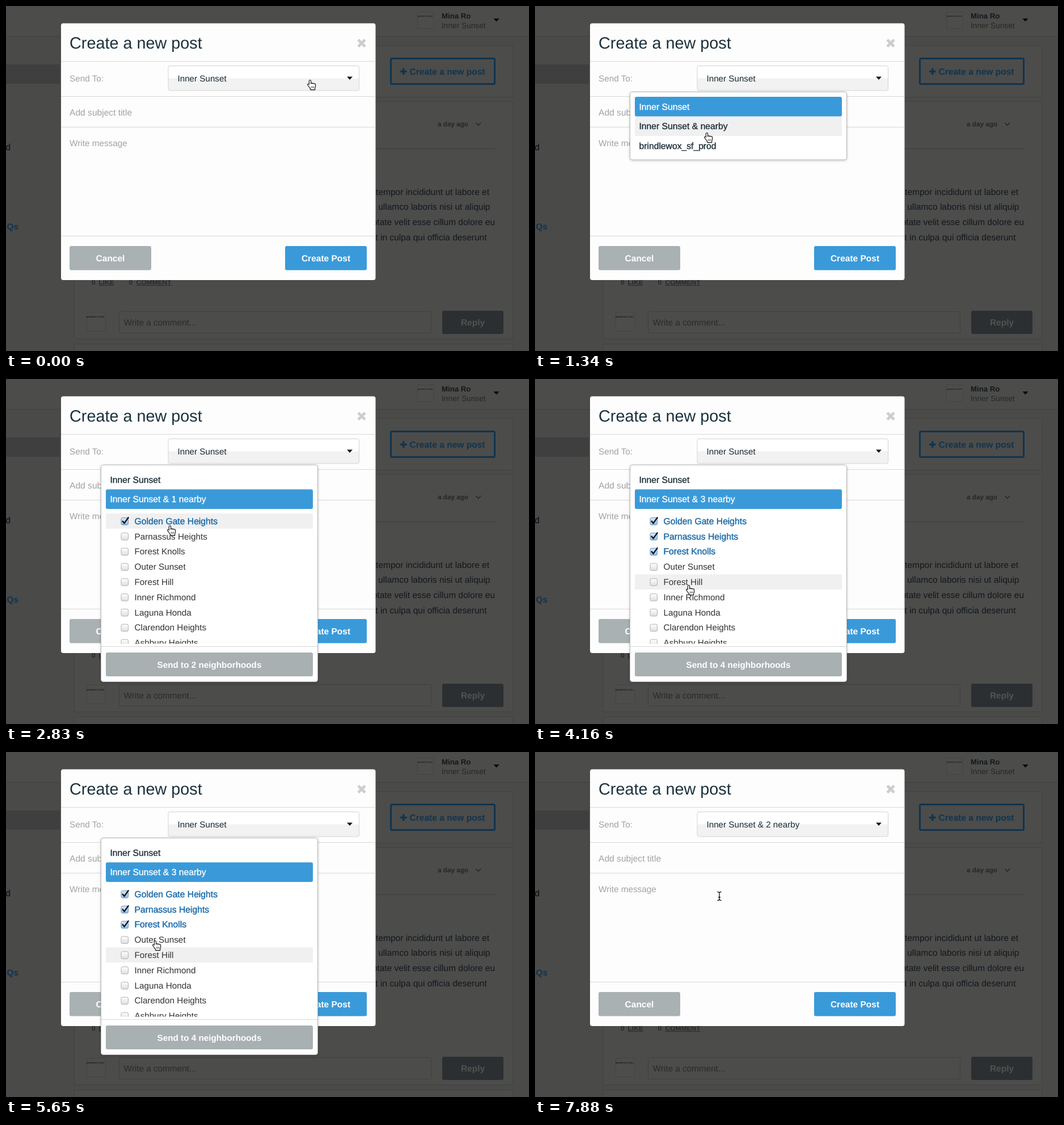
These frames come from a looping animation (922x608 px, 8000 ms). An HTML page:

```html
<!DOCTYPE html>
<html lang="en">
<head>
<meta charset="utf-8">
<title>Create a new post</title>
<style>
  html, body { margin: 0; width: 100%; height: 100%; overflow: hidden; background: #4a4a49; }
  svg { display: block; width: 922px; height: 608px; font: 15.3px "Liberation Sans", Arial, sans-serif; text-rendering: geometricPrecision; }
  text { fill: #12181c; }
  .bold { font-weight: bold; }
  .mid { font-size: 15.7px; fill: #1b2c37; stroke: #1b2c37; stroke-width: .35px; }
  .on { font-size: 15.7px; fill: #1c6ca9; stroke: #1c6ca9; stroke-width: .45px; }
  .lit { fill: #fff; stroke: #fff; }
  .hint { fill: #a2a2a2; }
  .btn { font-weight: bold; font-size: 15.5px; fill: #fff; text-anchor: middle; }
  .end { text-anchor: end; }
  .card { fill: #4c4c4b; stroke: #424241; }
  .rule { stroke: #d8d8d8; }
  .row { fill: #333; }
  .menu { fill: #fff; stroke: #b9b9b9; filter: drop-shadow(0 1px 2px rgba(0, 0, 0, .22)); }
  .tick { fill: none; stroke: #0b1320; stroke-width: 2.3px; }
</style>
</head>
<body>
<svg viewBox="0 0 922 608">
  <defs>
    <linearGradient id="boxOff" x2="0" y2="1"><stop stop-color="#fff"/><stop offset="1" stop-color="#dedede"/></linearGradient>
    <linearGradient id="boxOn" x2="0" y2="1"><stop stop-color="#dcebf8"/><stop offset="1" stop-color="#8fbde6"/></linearGradient>
    <clipPath id="listClip"><rect x="168" y="230" width="382" height="236.5"/></clipPath>
  </defs>

  <!-- dimmed page -->
  <rect width="922" height="608" fill="#4a4a49"/>
  <rect width="922" height="53" fill="#4c4c4b"/>
  <path d="M0 53.5H922" stroke="#404040"/>
  <rect y="103" width="95" height="34" fill="#3f3f3f"/>
  <rect class="card" x="120.5" y="69.5" width="773" height="91"/>
  <rect class="card" x="120.5" y="168.5" width="773" height="418"/>
  <rect class="card" x="120.5" y="595.5" width="773" height="30"/>
  <path d="M140 251.5H862" stroke="#3d3d3d"/>

  <g fill="#4d4d4c" stroke="#434343">
    <rect x="725.5" y="10.5" width="28" height="29"/>
    <rect x="142.5" y="539.5" width="33" height="33" rx="2"/>
  </g>
  <text class="bold" x="726" y="18.5" font-size="3.6">posted in 2 min</text>
  <text class="bold" x="142" y="549" font-size="4.2">posted in 2 min</text>
  <text class="bold" x="768" y="22.2" font-size="13.2">Mina Ro</text>
  <text x="768" y="38.5" font-size="13.7" style="fill:#272727">Inner Sunset</text>
  <path d="M859.5 22H869.5L864.5 27.5Z" fill="#080808"/>

  <rect x="678.5" y="92.5" width="183" height="45" rx="2" fill="none" stroke="#11344d" stroke-width="3"/>
  <path d="M695 115.5H706.5M700.75 109.8V121.2" stroke="#11344d" stroke-width="3.4"/>
  <text class="bold" x="711.5" y="120.6" font-size="15.55" style="fill:#11344d">Create a new post</text>
  <text class="bold" x="761" y="211.8" font-size="11.7" style="fill:#262626">a day ago</text>
  <path d="M828.5 205.8L832.7 210.4L837 205.8" fill="none" stroke="#262626" stroke-width="1.5"/>
  <g class="end" font-size="15.5">
    <text x="852" y="332.5">tempor incididunt ut labore et</text>
    <text x="853.5" y="359.4">ullamco laboris nisi ut aliquip</text>
    <text x="862" y="386.2">voluptate velit esse cillum dolore eu</text>
    <text x="847.5" y="413">sunt in culpa qui officia deserunt</text>
  </g>
  <text class="end" x="8" y="253.8" stroke="#12181c" stroke-width=".4">and</text>
  <text class="end bold" x="22" y="394" style="fill:#11344d">FAQs</text>

  <g class="bold" font-size="12">
    <text x="151" y="490.5" style="fill:#2a2a2a">0</text>
    <text x="163.5" y="490.5" style="fill:#2a2a2a">LIKE</text>
    <text x="216.5" y="490.5" style="fill:#2a2a2a">0</text>
    <text x="229.5" y="490.5" style="fill:#2a2a2a">COMMENT</text>
  </g>
  <path d="M163.5 492.5H190M229.5 492.5H292" stroke="#2a2a2a"/>
  <rect x="199.5" y="538.5" width="550" height="38" rx="2" fill="#4c4c4b" stroke="#404040"/>
  <text x="207.5" y="563.3" style="fill:#2b2b2b">Write a comment...</text>
  <rect x="769" y="537" width="108" height="41" rx="3" fill="#2c2f31"/>
  <text class="btn" x="823" y="563.4" style="fill:#525252">Reply</text>

  <!-- dialog -->
  <rect x="97" y="30.5" width="554.5" height="452.5" rx="4" fill="#fdfdfd"/>
  <path class="rule" d="M97 97.5H651.5M97 159.5H651.5M97 213.5H651.5M97 405.5H651.5"/>
  <text x="112" y="74.6" font-size="28.8" style="fill:#1b313d">Create a new post</text>
  <path d="M621 59.5L633 71.5M633 59.5L621 71.5" stroke="#cdcdcd" stroke-width="4.8"/>
  <text class="hint" x="112" y="133.3">Send To:</text>
  <rect x="286" y="106" width="336.5" height="43" rx="3" fill="#fff"/>
  <path d="M286 127.5H622.5V146a3 3 0 0 1-3 3H289a3 3 0 0 1-3-3Z" fill="#f2f2f2"/>
  <rect x="286" y="105.5" width="336.5" height="43.5" rx="3" fill="none" stroke="#d3d3d3"/>
  <text id="choice" x="302.5" y="133.3" font-size="15.2" style="fill:#1b2c37"></text>
  <path d="M601 124.5H611L606 130Z" fill="#0d1a22"/>
  <text class="hint" x="112" y="192.8" font-size="15.6">Add subject title</text>
  <text class="hint" x="112" y="247.2">Write message</text>
  <rect x="112" y="423" width="144" height="42.5" rx="3" fill="#a9b1b3"/>
  <text class="btn" x="184" y="450.3">Cancel</text>
  <rect x="492" y="423" width="144" height="42.5" rx="3" fill="#3a9ad9"/>
  <text class="btn" x="564" y="450.3">Create Post</text>

  <!-- menu -->
  <g id="menu">
    <rect id="panel" class="menu" x="167.5" y="151.5" width="382" rx="4"/>
    <rect id="hover" x="176" width="365" fill="#f0f0f0"/>
    <rect id="pick" x="176" width="365" height="34.5" rx="3" fill="#3a9ad9"/>
    <text id="own" x="183.5" y="182.9">Inner Sunset</text>
    <text id="near" x="183.5" y="217.3"></text>
    <text id="group" class="mid" x="183.5" y="251.8">brindlewox_sf_prod</text>
    <g id="more">
      <g id="list" clip-path="url(#listClip)"></g>
      <path class="rule" d="M168 471.5H549"/>
      <rect id="send" x="176" y="482" width="365" height="42" rx="3"/>
      <text id="sendText" class="btn" x="358.5" y="508.5" style="font-size:15.25px"></text>
    </g>
  </g>

  <g id="cursor" stroke="#111" stroke-linejoin="round">
    <g id="hand">
      <path fill="#fff" stroke-width="1.15" d="M-4.6-6.8q0-1.7 1.6-1.7t1.6 1.7v4.6q.2-1 1.4-1t1.4 1.2q.3-.9 1.4-.8t1.3 1.2q.3-.7 1.3-.6t1.2 1.4v3.4q0 1.6-.9 3.2v2.8h-8v-1.8q-1.5-1.6-2.6-3.6-1.2-1.4-2.2-3-.8-1.2.3-1.8t2.2.8z"/>
      <path d="M-.7 2.5v3.2M1.5 2.5v3.2M3.7 2.5v3.2" stroke-width=".8"/>
    </g>
    <path id="beam" fill="none" stroke-width="1.3" d="M-3.5-7.5q3.5 0 3.5 2v11q0 2-3.5 2M3.5-7.5q-3.5 0-3.5 2M3.5 7.5q-3.5 0-3.5-2M-2 2h4"/>
  </g>
</svg>

<script>
const LOOP = 8000, TICK = 148.5;
const ROW_TOP = 237, ROW_H = 26.8;
const OPEN = 2, EXPAND = 13, CLOSE = 49, BEAM = 51;

const places = ["Golden Gate Heights", "Parnassus Heights", "Forest Knolls", "Outer Sunset", "Forest Hill",
  "Inner Richmond", "Laguna Honda", "Clarendon Heights", "Ashbury Heights"];
// place index -> [tick checked, tick unchecked]
const checks = { 0: [19, 99], 1: [23, 99], 2: [26, 41], 5: [31, 36] };
// pointer stops: tick, x, y
const stops = [
  [2, 539, 139], [9, 306, 232], [13, 306, 232], [17, 292, 267], [19, 292, 267], [21, 284, 288], [23, 283, 288],
  [25, 276, 314], [26, 276, 314], [27, 274, 358], [28, 274, 372], [29, 273, 385], [32, 273, 385], [33, 268, 394],
  [34, 267, 393], [36, 267, 393], [37, 267, 368], [38, 266, 341], [39, 266, 316], [41, 266, 316],
  [47, 283, 507], [49, 283, 507], [53, 325, 254]
];

const $ = id => document.getElementById(id);
const show = (id, on) => $(id).setAttribute("display", on ? "inline" : "none");
const set = (el, attrs) => { for (const k in attrs) el.setAttribute(k, attrs[k]); };

$("list").innerHTML = places.map((name, i) => {
  const y = ROW_TOP + ROW_H * (i + .5);
  return `<g><rect x="203" y="${y - 5.8}" width="12.5" height="12.5" rx="2.5"/>
    <path class="tick" d="M205 ${y - .5}l3.6 4.2 7.6-10.6"/>
    <text x="226.5" y="${y + 5.3}">${name}</text></g>`;
}).join("");
const rows = [...$("list").children];

function pointer(n) {
  const i = stops.findIndex(s => s[0] >= n);
  if (i < 1) return stops[0].slice(1);
  const [a, x0, y0] = stops[i - 1], [b, x1, y1] = stops[i];
  const u = (n - a) / (b - a), e = u * u * (3 - 2 * u);
  return [x0 + (x1 - x0) * e, y0 + (y1 - y0) * e];
}

// highlight under the pointer: [top, height]
function hoverBand(tip, expanded) {
  if (!expanded) {
    const i = Math.floor((tip - 160) / 34.5);
    return i > 0 && i < 3 ? [160 + 34.5 * i, 34.5] : [0, 0];
  }
  const i = Math.floor((tip - ROW_TOP) / ROW_H);
  return i >= 0 && tip < 466 ? [ROW_TOP + ROW_H * i, Math.min(ROW_H, 466 - ROW_TOP - ROW_H * i)] : [0, 0];
}

function draw(n) {
  const expanded = n >= EXPAND;
  const [x, y] = pointer(n);
  const tip = pointer(n - 1)[1] - 8; // hover trails the pointer by one tick
  let count = 0;

  rows.forEach((row, i) => {
    const [from, to] = checks[i] || [99, 99];
    const on = n >= from && n < to;
    count += on;
    const [box, mark, label] = row.children;
    set(box, { fill: on ? "url(#boxOn)" : "url(#boxOff)", stroke: on ? "#6d8db0" : "#b0b0b0" });
    set(mark, { display: on ? "inline" : "none" });
    set(label, { class: on ? "on" : "row" });
  });

  show("menu", n >= OPEN && n < CLOSE);
  show("more", expanded);
  show("group", !expanded);
  set($("panel"), { height: expanded ? 382 : 119.5 });
  set($("pick"), { y: expanded ? 194.5 : 160 });
  set($("own"), { class: expanded ? "mid" : "mid lit" });
  set($("near"), { class: expanded ? "mid lit" : "mid" });
  const [top, height] = hoverBand(tip, expanded);
  set($("hover"), { y: top, height });

  const nearby = `Inner Sunset & ${count ? count + " " : ""}nearby`;
  $("near").textContent = nearby;
  $("choice").textContent = n >= CLOSE ? nearby : "Inner Sunset";
  $("sendText").textContent = `Send to ${count + 1} neighborhood${count ? "s" : ""}`;
  set($("send"), { fill: !count ? "#d3d8d9" : tip > 482 ? "#99a3a5" : "#a8b0b2" });

  set($("cursor"), { transform: `translate(${x.toFixed(1)} ${y.toFixed(1)})` });
  show("hand", n < BEAM);
  show("beam", n >= BEAM);
}

let last = -1;
function frame() {
  const n = Math.floor((performance.now() % LOOP + 1.1) / TICK);
  if (n !== last) draw(last = n);
  requestAnimationFrame(frame);
}
frame();
</script>
</body>
</html>
```
